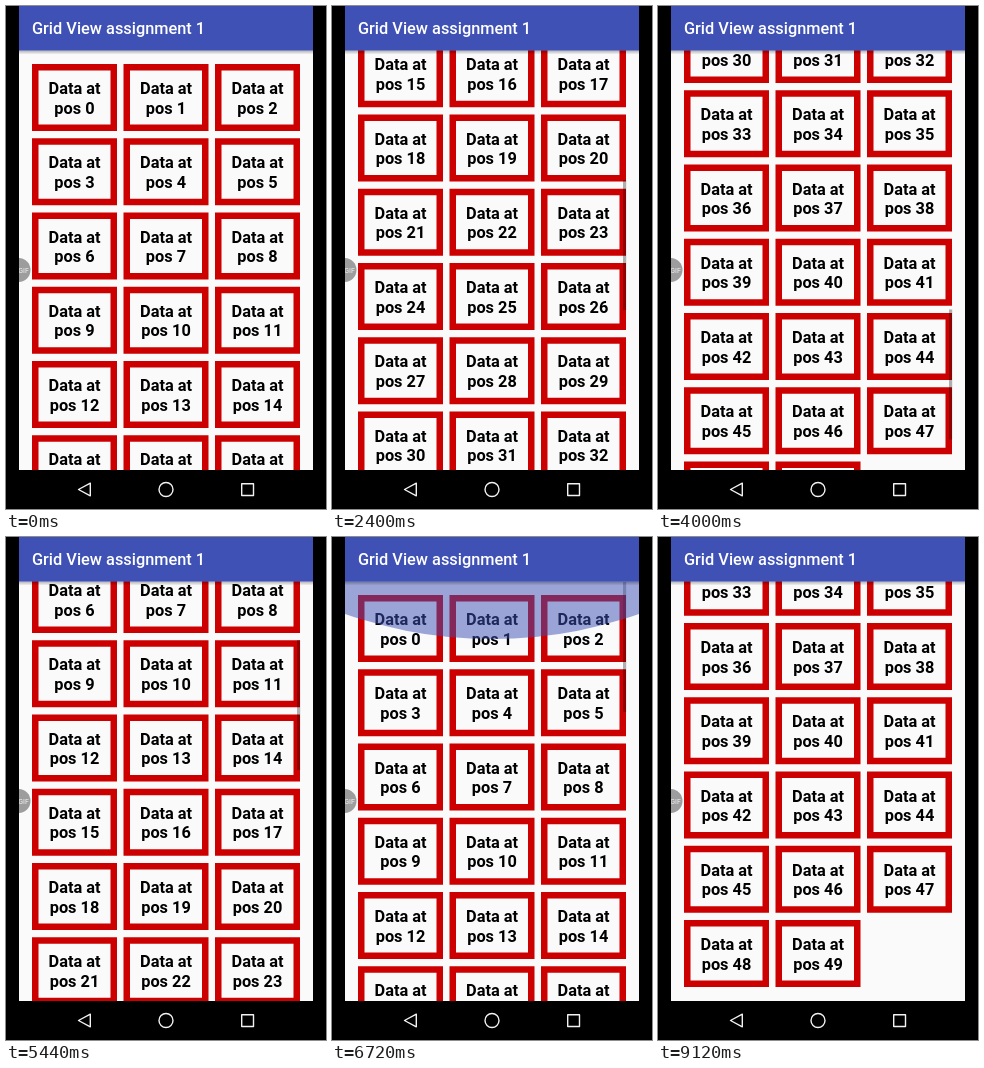
Write an HTML page with a canvas that moves like this. It is 320 px wide and 503 px high and loops after 9600 ms.

```html
<!DOCTYPE html>
<html lang="en">
<head>
<meta charset="utf-8">
<title>Grid scroll</title>
<style>
html, body { margin: 0; width: 100%; height: 100%; overflow: hidden; background: #000; }
canvas { display: block; width: 320px; height: 503px; }
</style>
</head>
<body>
<canvas id="stage"></canvas>
<script>
const W = 320, H = 503, LOOP = 9600, STEP = 160;
const LEFT = 13, RIGHT = 307, BAR = 44.6, BOTTOM = 464;
const CELL_W = 85, CELL_H = 67, PITCH_X = 91.5, PITCH_Y = 74.25, EDGE = 6.5;
const COUNT = 50, MAX_SCROLL = 863;
const INDIGO = '#3f51b5';

const canvas = document.getElementById('stage');
const ratio = window.devicePixelRatio || 1;
canvas.width = W * ratio;
canvas.height = H * ratio;
const ctx = canvas.getContext('2d');
ctx.scale(ratio, ratio);

// Pairs of [time, value], joined by straight lines.
const SCROLL = [
  [960, 0], [1120, 7], [1280, 34], [1440, 71], [1600, 111], [1760, 158],
  [2080, 268], [2400, 395], [2720, 498], [3040, 498], [3200, 509.5],
  [3360, 548], [3680, 670], [4000, 790.5], [4160, 836], [4320, 858],
  [4480, MAX_SCROLL], [4640, 838], [4800, 740], [5120, 430], [5280, 290],
  [5440, 177.5], [5600, 105], [5760, 56], [5920, 25], [6080, 9], [6240, 0],
  [7840, 0], [8000, 50], [8160, 340], [8320, 670], [8480, 820], [8640, MAX_SCROLL]
];
const GLOW = [[6400, 0], [6560, 0.65], [6720, 1], [6880, 0.85], [7360, 0]];
const THUMB = [
  [960, 0], [1120, 1], [6880, 1], [7360, 0], [7840, 0], [8000, 1],
  [8800, 1], [8960, 0.5], [9120, 0]
];

function valueAt(keys, t) {
  if (t <= keys[0][0]) return keys[0][1];
  for (let i = 1; i < keys.length; i++) {
    const [t0, a] = keys[i - 1], [t1, b] = keys[i];
    if (t < t1) return a + (b - a) * (t - t0) / (t1 - t0);
  }
  return keys[keys.length - 1][1];
}

function rect(x, y, w, h, color) {
  ctx.fillStyle = color;
  ctx.fillRect(x, y, w, h);
}

function label(text, x, y, font, color, align) {
  ctx.font = font;
  ctx.fillStyle = color;
  ctx.textAlign = align;
  ctx.fillText(text, x, y);
}

function drawCell(i, scroll) {
  const x = 26 + (i % 3) * PITCH_X;
  const y = 58 + Math.floor(i / 3) * PITCH_Y - scroll;
  if (y + CELL_H < BAR || y > BOTTOM) return;
  rect(x, y, CELL_W, CELL_H, '#cc0000');
  rect(x + EDGE, y + EDGE, CELL_W - 2 * EDGE, CELL_H - 2 * EDGE, '#fafafa');
  const font = 'bold 16.33px Roboto, sans-serif';
  label('Data at', x + CELL_W / 2, y + 30, font, '#000', 'center');
  label('pos ' + i, x + CELL_W / 2, y + 49.5, font, '#000', 'center');
}

function drawThumb(scroll, alpha) {
  if (!alpha) return;
  rect(291, 45 + scroll * 0.327, 3.2, 130, `rgba(0, 0, 0, ${0.3 * alpha})`);
}

function drawGlow(power) {
  if (!power) return;
  const radius = 441;
  ctx.save();
  ctx.translate(160, BAR);
  ctx.scale(1, power);
  ctx.globalAlpha = 0.5 * Math.min(1, power * 1.1);
  ctx.fillStyle = INDIGO;
  ctx.beginPath();
  ctx.arc(0, 57.5 - radius, radius, 0, Math.PI * 2);
  ctx.fill();
  ctx.restore();
}

function drawBubble() {
  ctx.fillStyle = 'rgba(140, 140, 140, 0.85)';
  ctx.beginPath();
  ctx.arc(12.5, 264, 12, 0, Math.PI * 2);
  ctx.fill();
  label('GIF', 17.5, 266.5, '7px Roboto, sans-serif', '#f4f4f4', 'center');
}

function drawBar() {
  const shade = ctx.createLinearGradient(0, BAR, 0, BAR + 4);
  shade.addColorStop(0, 'rgba(0, 0, 0, 0.28)');
  shade.addColorStop(1, 'rgba(0, 0, 0, 0)');
  rect(LEFT, BAR, RIGHT - LEFT, 4, shade);
  rect(LEFT, 0, RIGHT - LEFT, BAR, INDIGO);
  label('Grid View assignment 1', 26, 28, '500 16.33px Roboto, sans-serif', '#fff', 'left');
}

function drawNav() {
  ctx.strokeStyle = '#f2f2f2';
  ctx.lineWidth = 1.4;
  ctx.lineJoin = 'round';
  ctx.beginPath();
  ctx.moveTo(72.5, 483.5);
  ctx.lineTo(84.3, 477.2);
  ctx.lineTo(84.3, 489.8);
  ctx.closePath();
  ctx.moveTo(167, 483.5);
  ctx.arc(160, 483.5, 7, 0, Math.PI * 2);
  ctx.rect(235.7, 477.7, 11.8, 11.8);
  ctx.stroke();
}

function draw(t) {
  const scroll = valueAt(SCROLL, t);
  rect(0, 0, W, H, '#000');
  ctx.save();
  ctx.beginPath();
  ctx.rect(LEFT, 0, RIGHT - LEFT, BOTTOM);
  ctx.clip();
  rect(LEFT, 0, RIGHT - LEFT, BOTTOM, '#fafafa');
  for (let i = 0; i < COUNT; i++) drawCell(i, scroll);
  drawThumb(scroll, valueAt(THUMB, t));
  drawGlow(valueAt(GLOW, t));
  drawBar();
  drawBubble();
  ctx.restore();
  drawNav();
}

const start = performance.now();
function tick() {
  const t = (performance.now() - start) % LOOP;
  draw(Math.floor(t / STEP) * STEP);
  requestAnimationFrame(tick);
}
tick();
</script>
</body>
</html>
```
